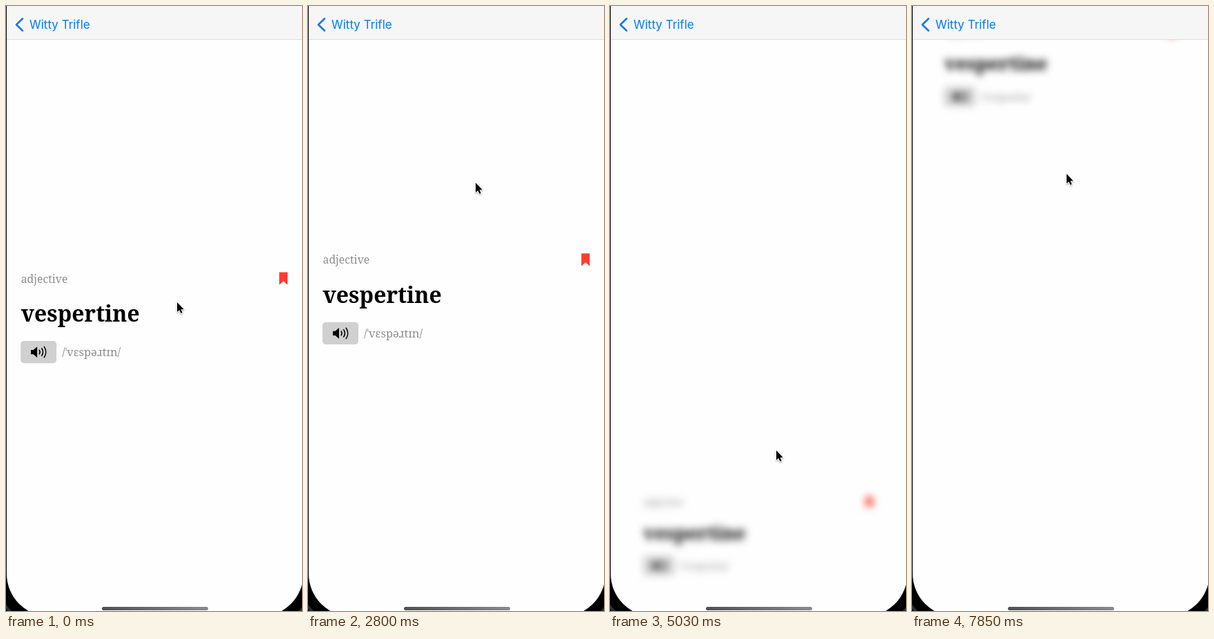
An HTML page with a canvas for the animation above (8000 ms loop, 429x876 px).

```html
<!DOCTYPE html>
<html lang="en">
<head>
<meta charset="utf-8">
<title>Word card</title>
<style>
  html, body { margin: 0; width: 100%; height: 100%; overflow: hidden; background: #fefefe; }
  canvas { display: block; width: 429px; height: 876px; }
</style>
</head>
<body>
<canvas id="stage"></canvas>
<script>
const W = 429, H = 876, LOOP = 8000, STEP = 148.3;
const REST = 423.5, MID_X = 214.5;
const SERIF = '"Noto Serif", serif';
const BLUE = '#007aff', GRAY = '#8e8e8e';

const canvas = document.getElementById('stage');
const ctx = canvas.getContext('2d');
const dpr = window.devicePixelRatio || 1;
canvas.width = W * dpr;
canvas.height = H * dpr;

// Every drag takes DRAG steps, holds, then lets the card spring back.
const DRAG = 4, HOLD = 1.2, STIFFNESS = 1.9;
const drag = (start, x, y, toX, travel) => ({ start, x, y, toX, travel });
const drags = [
  drag(-7.4, 248, 46, 248, 343.5),
  drag(5.8, 248, 603, 236, -316.5),
  drag(19.1, 243, 256, 233, 290),
  drag(30, 239, 300, 241, 343.5),
  drag(38, 246, 626, 246, -325),
  drag(49, 232, 579, 224, -336)
];

const smooth = u => u * u * (3 - 2 * u);
const mix = (a, b, u) => a + (b - a) * u;

function poseAt(step) {
  const i = drags.findLastIndex(d => d.start <= step);
  const d = drags[i], next = drags[i + 1];
  const pull = Math.sin(Math.min(1, (step - d.start) / DRAG) * Math.PI / 2);
  const release = d.start + DRAG + HOLD;
  const z = Math.max(0, step - release) * STIFFNESS;
  const pose = {
    y: REST + d.travel * pull * (1 + z) * Math.exp(-z),
    px: mix(d.x, d.toX, pull),
    py: d.y + d.travel * pull
  };
  if (z > 0 && next) {
    const glide = smooth((step - release) / (next.start - release));
    pose.px = mix(pose.px, next.x, glide);
    pose.py = mix(pose.py, next.y, glide);
  }
  return pose;
}

function polygon(points) {
  ctx.beginPath();
  points.forEach(([x, y]) => ctx.lineTo(x, y));
  ctx.closePath();
}

function fillRound(x, y, w, h, r, color) {
  ctx.fillStyle = color;
  ctx.beginPath();
  ctx.roundRect(x, y, w, h, r);
  ctx.fill();
}

function label(text, x, y, font, color) {
  ctx.font = font;
  ctx.fillStyle = color;
  ctx.fillText(text, x, y);
}

function drawScreen() {
  ctx.fillStyle = '#000';
  ctx.fillRect(0, 0, W, H);
  ctx.strokeStyle = '#2c2e31';
  ctx.lineWidth = 4;
  for (const x of [63, 369]) {
    ctx.beginPath();
    ctx.arc(x, 822, 79, 0, Math.PI);
    ctx.stroke();
  }
  fillRound(1, -80, 430, 964, 62, '#fefefe');
}

function drawSpeaker() {
  ctx.fillStyle = ctx.strokeStyle = '#000';
  polygon([[36, 47.3], [39.5, 47.3], [45, 42.5], [45, 58.3], [39.5, 53.5], [36, 53.5]]);
  ctx.fill();
  ctx.lineWidth = 1.6;
  ctx.lineCap = 'round';
  for (const r of [5, 9.3, 13.6]) {
    ctx.beginPath();
    ctx.arc(44, 50.4, r, -0.6, 0.6);
    ctx.stroke();
  }
}

// The card shrinks and blurs with its squared distance from the middle.
function drawCard(y) {
  const away = 1.18e-6 * (y - 422) ** 2;
  const blur = 42 * away;
  ctx.save();
  ctx.beginPath();
  ctx.rect(1, 49, W, H);
  ctx.clip();
  ctx.translate(MID_X, y);
  ctx.scale(1 - away, 1 - away);
  ctx.translate(-MID_X, 0);
  if (blur > 0.15) ctx.filter = `blur(${(blur * dpr).toFixed(2)}px)`;

  label('adjective', 21.5, -50, `15.8px ${SERIF}`, GRAY);
  label('vespertine', 21.5, 6.5, `bold 31.9px ${SERIF}`, '#000');
  fillRound(21, 34.3, 52, 32.3, 5, '#d0d0d0');
  drawSpeaker();
  label('/ˈvɛspəɹtɪn/', 81, 56.5, `16.5px ${SERIF}`, GRAY);

  ctx.fillStyle = '#ff3b30';
  polygon([[396.2, -65.3], [408.2, -65.3], [408.2, -47], [402.2, -52.5], [396.2, -47]]);
  ctx.fill();
  ctx.restore();
}

function drawHeader() {
  ctx.fillStyle = '#f6f6f6';
  ctx.fillRect(1, 0, W, 48);
  ctx.fillStyle = '#dedede';
  ctx.fillRect(1, 48, W, 1);
  ctx.strokeStyle = BLUE;
  ctx.lineWidth = 2.6;
  ctx.lineCap = ctx.lineJoin = 'round';
  ctx.beginPath();
  ctx.moveTo(24, 18.3);
  ctx.lineTo(15, 27);
  ctx.lineTo(24, 35.7);
  ctx.stroke();
  label('Witty Trifle', 34, 33, '17px Inter, sans-serif', BLUE);
}

function drawHomeBar() {
  const shade = ctx.createLinearGradient(139, 0, 293, 0);
  shade.addColorStop(0, '#505050');
  shade.addColorStop(1, '#8a8a8a');
  fillRound(139, 870, 154, 5, 2.5, shade);
}

function drawPointer(x, y) {
  ctx.save();
  ctx.translate(x, y);
  polygon([[0, 0], [0, 14], [3.2, 11.2], [5.6, 16], [7.7, 15], [5.5, 10.2], [9.8, 10.2]]);
  ctx.shadowColor = 'rgba(0,0,0,0.35)';
  ctx.shadowBlur = 2 * dpr;
  ctx.shadowOffsetY = dpr;
  ctx.strokeStyle = '#fff';
  ctx.lineWidth = 2;
  ctx.lineJoin = 'round';
  ctx.stroke();
  ctx.shadowColor = 'transparent';
  ctx.fillStyle = '#000';
  ctx.fill();
  ctx.restore();
}

function draw(time) {
  // The picture advances in even steps.
  const pose = poseAt(Math.floor((time % LOOP + 24) / STEP));
  ctx.setTransform(dpr, 0, 0, dpr, 0, 0);
  drawScreen();
  drawCard(pose.y);
  drawHeader();
  drawHomeBar();
  drawPointer(pose.px, pose.py);
}

const start = performance.now();
function tick() {
  draw(performance.now() - start);
  requestAnimationFrame(tick);
}
tick();
</script>
</body>
</html>
```
